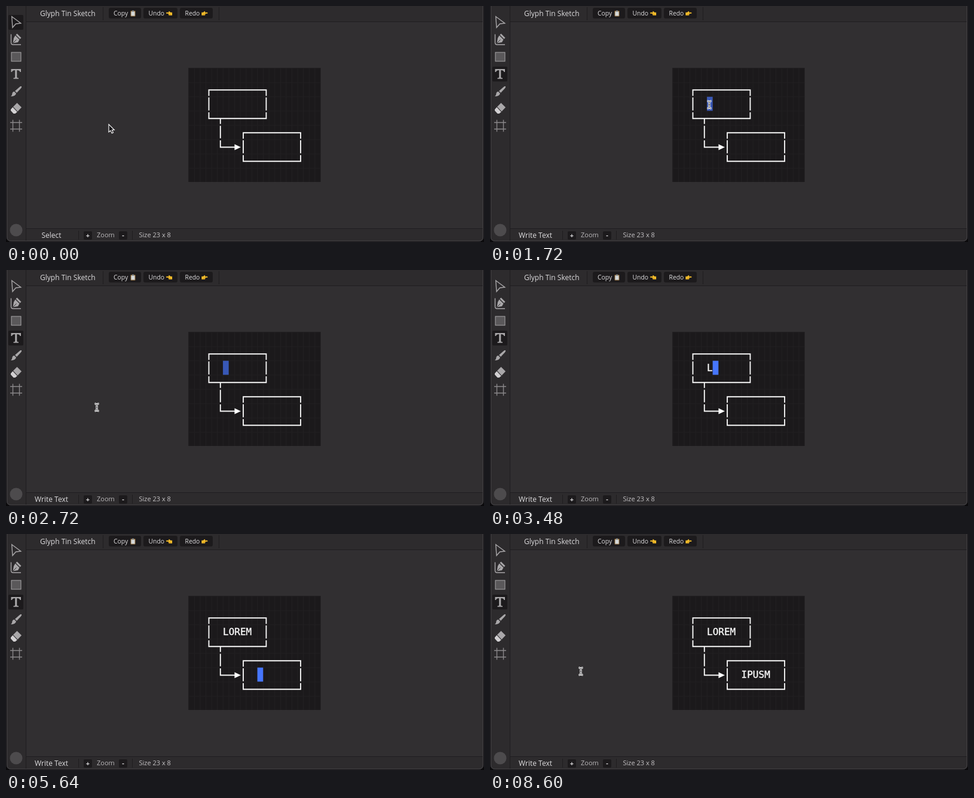
An HTML page for the animation above (8.68 s loop, 800 px wide and 397 px high).

```html
<!DOCTYPE html>
<html lang="en">
<head>
<meta charset="utf-8">
<title>Glyph Tin Sketch</title>
<style>
html, body { margin: 0; width: 100%; height: 100%; overflow: hidden; background: #0b0a0c; }
svg { display: block; width: 800px; height: 397px; font: 11px "Open Sans", sans-serif; fill: #dddcde; }
.mono { font: 16px "DejaVu Sans Mono", monospace; fill: #fff; stroke: #fff; stroke-width: .3; white-space: pre; }
.title { font-size: 12px; }
.button { font-size: 10.4px; }
.dark { fill: #1c1a1c; }
.rule { stroke: #1f1d20; fill: none; }
.icon { fill: #a9a7a9; }
.line { fill: none; stroke: #a9a7a9; stroke-width: 1.4; }
.box { fill: none; stroke: #f8f8f8; stroke-width: 1.9; }
</style>
</head>
<body>
<svg viewBox="0 0 800 397">
  <defs>
    <pattern id="grid" x="305.2" y="104.3" width="9.6" height="24" patternUnits="userSpaceOnUse">
      <path d="M0 .5H9.6M.5 0V24" stroke="#211f21" fill="none"/>
    </pattern>
    <path id="frame" class="box" d="M0 10V0H96V10M0 12.5V34.500M96 12.5V34.5M0 37.5V48H96V37.5"/>
    <g id="hand">
      <path d="M0 4.6Q0 3.6 1 3.6H5L4.6 2Q5 .8 6 1.6L8 3.6H11V9H6Q4 9 4.2 5.6H1Q0 5.6 0 4.6Z" fill="#f4bd2a"/>
      <path d="M5 6.8H8M5.4 8.1H8" stroke="#c08a1c" stroke-width=".7"/>
    </g>
  </defs>

  <path d="M1 0H799V388Q799 396 791 396H9Q1 396 1 388Z" fill="#312f31"/>
  <path d="M1 0H799V26H33V374H799V388Q799 396 791 396H9Q1 396 1 388Z" fill="#2d2b2d"/>
  <path class="rule" d="M33 26.5H798M33.5 0V395M33 374.5H798M162.5 2V24M356.5 2V24M121.5 378V393M211.5 378V393"/>
  <path d="M1.5 0V388Q1.5 395.5 9 395.5H791Q798.5 395.5 798.5 388V0" fill="none" stroke="#48464a"/>

  <text class="title" x="57" y="17">Glyph Tin Sketch</text>
  <g class="dark">
    <rect x="172" y="3" width="54" height="18" rx="3"/>
    <rect x="230" y="3" width="57" height="18" rx="3"/>
    <rect x="291" y="3" width="55" height="18" rx="3"/>
    <rect x="130" y="379" width="14" height="14" rx="2"/>
    <rect x="189" y="379" width="14" height="14" rx="2"/>
  </g>
  <g class="button">
    <text x="180" y="16">Copy</text>
    <text x="238.500" y="16">Undo</text>
    <text x="299.5" y="16">Redo</text>
  </g>
  <rect x="208.5" y="8" width="8" height="9.5" rx="1" fill="#98733f"/>
  <path d="M209.5 9.5H215.5V16.5H209.5Z" fill="#d5d9da"/>
  <path d="M211 7.5H214V10H211Z" fill="#8d9294"/>
  <use href="#hand" transform="translate(268 7.5) scale(.92)"/>
  <use href="#hand" transform="translate(337.5 7.5) scale(-.92 .92)"/>

  <text id="status" class="title" x="76" y="390" text-anchor="middle"></text>
  <g font-weight="700" text-anchor="middle"><text x="137" y="390">+</text><text x="196" y="389">-</text></g>
  <text x="152" y="389" fill="#b8b6b8">Zoom</text>
  <text x="222.5" y="389" fill="#c5c3c5">Size 23 x 8</text>

  <rect id="tool" class="dark" x="4" width="25" height="25" rx="2"/>
  <path class="line" d="M9.7 17.8L24.8 29L16.5 30L11 36.2Z"/>
  <path class="icon" d="M18.5 46.5L25.5 53.5L23.5 55.5L16.5 48.5ZM15.5 49.5L22.5 56.5L20 61L11.500 62.5L13 54Z"/>
  <path d="M12 62L17.5 56.5" stroke="#2d2b2d"/>
  <path class="line" d="M8.5 47.5V61.5Q8.5 65 12 65H25"/>
  <rect x="9" y="78" width="16" height="15" fill="#5a585a" stroke="#a9a7a9"/>
  <path class="icon" d="M8.5 106H25V111H23.5Q23 108 18.3 108V120.3Q18.5 121 21 121V122.5H12.5V121Q15 121 15.2 120.3V108Q10.5 108 10 111H8.5Z"/>
  <path class="icon" d="M25.5 135Q27 136 25 138.5L18 146L15 143L23 136Q24.5 134.5 25.5 135ZM14 144L17 147Q16 152 8 152Q10.5 150 10.5 147Q11 144 14 144Z"/>
  <path class="icon" d="M18.5 163L26 170.500L19.5 177.5L12 169.5Z"/>
  <path d="M11.3 170.3L18.800 178.3L15.500 181H12.5L8 176V174Z" fill="#d2d0d2"/>
  <path class="line" d="M7 196H27M7 207H27M11.5 191.5V211.5M22.5 191.5V211.5" stroke-opacity=".75"/>
  <circle cx="17" cy="377" r="10.5" fill="#4d4b4d"/>

  <rect x="305" y="104" width="221.5" height="192" fill="#1b191b"/>
  <rect x="305" y="104" width="221.5" height="192" fill="url(#grid)"/>
  <use href="#frame" x="339.5" y="141.3"/>
  <use href="#frame" x="397.1" y="213.3"/>
  <path class="box" d="M358.8 189.3V198.5M358.8 201.5V222.5M358.8 226V237.5H384"/>
  <path d="M382.5 232.5L393 237.5L382.5 242.5Z" fill="#fff"/>
  <rect id="hover" width="9.6" height="23.6" fill="#3a58b4"/>
  <text id="first" class="mono" x="363" y="170"></text>
  <text id="second" class="mono" x="420.6" y="242"></text>
  <rect id="caret" width="9.6" height="23.6" fill="#4676ff"/>

  <path id="arrow" d="M0 0V13L3 10.5L5.2 15L7.5 14L5.5 9.5H9.3Z" fill="#161518" stroke="#fff" stroke-width="1.1"/>
  <g id="beam" fill="none">
    <path d="M-3.5 -6H-2L0 -4.5L2 -6H3.5M-3.5 6H-2L0 4.5L2 6H3.5M0 -4.5V4.5M-2 0H2" stroke="#fff" stroke-width="3"/>
    <path d="M-3 -6H-2L0 -4.5L2 -6H3M-3 6H-2L0 4.5L2 6H3M0 -4.5V4.5M-2 0H2" stroke="#242226" stroke-width=".8"/>
  </g>
</svg>
<script>
const LOOP = 8680, STEP = 40, LEFT = 305.5, TOP = 104.7, CELL_W = 9.6, CELL_H = 24;
const PICK = 920, CLICK = 1800, ESCAPE = 7640;
const el = id => document.getElementById(id);

// Rows are [time, ...values]
const mousePath = [
  [480, 172, 199], [840, 14, 114], [960, 14, 114], [1240, 162, 134], [1320, 290, 155],
  [1560, 366, 167], [1880, 368, 165], [2240, 298, 193], [2600, 152, 231]
];
const caretFade = [
  [2600, 1], [2920, 0], [3200, 0], [3400, 1], [4520, 1], [4800, 0], [4840, 1],
  [5280, 1], [5560, 0], [5600, 1], [5760, 1], [6080, 0], [6120, 1], [7320, 1], [ESCAPE, 0]
];
const caretMoves = [[4840, 11, 3], [4960, 11, 4], [5120, 11, 5], [5600, 12, 5]];
const words = [
  { id: "first", text: "LOREM", keys: [3400, 3600, 3840, 3880, 4120], col: 6, row: 2 },
  { id: "second", text: "IPUSM", keys: [6120, 6240, 6440, 6720, 6960], col: 12, row: 5 }
];

function track(rows, t) {
  const i = rows.findIndex(r => r[0] > t);
  if (i < 0) return rows[rows.length - 1].slice(1);
  if (i === 0) return rows[0].slice(1);
  const a = rows[i - 1], b = rows[i];
  let k = (t - a[0]) / (b[0] - a[0]);
  k = k * k * (3 - 2 * k);
  return a.slice(1).map((v, n) => v + (b[n + 1] - v) * k);
}

function show(id, visible) {
  el(id).setAttribute("visibility", visible ? "visible" : "hidden");
}

function place(id, x, y) {
  el(id).setAttribute("transform", `translate(${x} ${y})`);
}

function placeCell(id, col, row) {
  place(id, LEFT + col * CELL_W, TOP + row * CELL_H);
}

function drawMouse(t) {
  const [x, y] = track(mousePath, t);
  const beam = t > PICK && x > 33;
  const inUse = t < words[0].keys[0] || t >= 8480;
  place("arrow", x, y);
  place("beam", x, y);
  show("arrow", inUse && !beam);
  show("beam", inUse && beam);

  const col = Math.max(0, Math.floor((x - LEFT) / CELL_W));
  show("hover", x > 296 && t > PICK && t < 2280);
  placeCell("hover", col, Math.floor((y - TOP) / CELL_H));
}

function drawText(t) {
  let cell = [words[0].col, words[0].row];
  for (const { id, text, keys, col, row } of words) {
    const typed = keys.filter(k => k <= t).length;
    el(id).textContent = text.slice(0, typed);
    if (typed) cell = [col + typed, row];
    if (id === "first") {
      for (const [time, c, r] of caretMoves) if (t >= time) cell = [c, r];
    }
  }
  placeCell("caret", ...cell);
  el("caret").setAttribute("opacity", track(caretFade, t)[0]);
  show("caret", t >= CLICK && t < ESCAPE);
}

function draw(now) {
  const t = Math.floor(now % LOOP / STEP) * STEP;
  const writing = t >= PICK;
  el("tool").setAttribute("y", writing ? 102 : 15);
  el("status").textContent = writing ? "Write Text" : "Select";
  drawMouse(t);
  drawText(t);
}

const start = performance.now();
function tick() {
  draw(performance.now() - start);
  requestAnimationFrame(tick);
}
tick();
</script>
</body>
</html>
```
